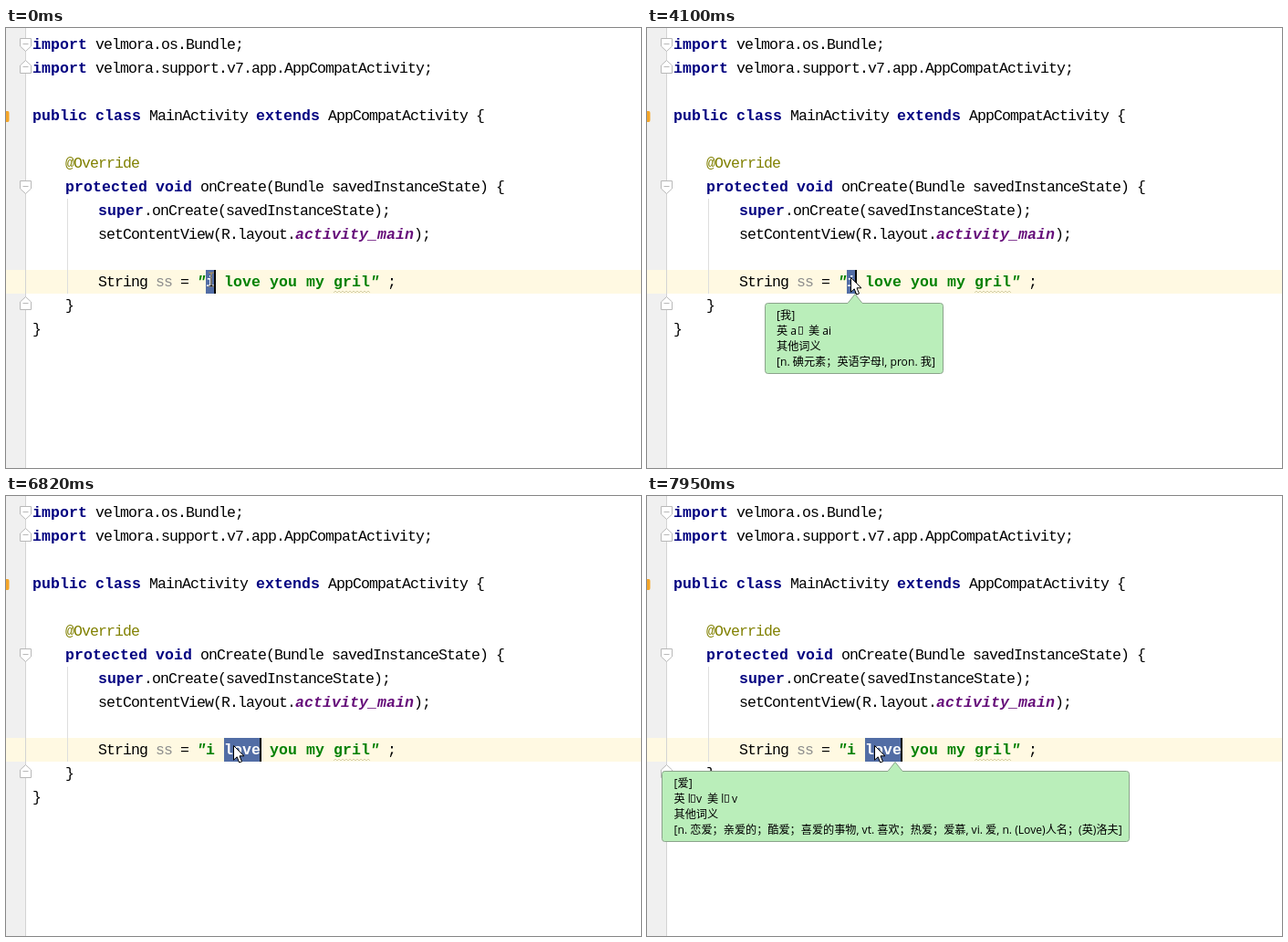
An HTML page for the animation above (8000 ms loop, 696 by 482 pixels).

```html
<!DOCTYPE html>
<html lang="zh-CN">
<head>
<meta charset="utf-8">
<style>
  html, body { margin: 0; width: 100%; height: 100%; overflow: hidden; background: #fff; }
  svg { display: block; width: 696px; height: 482px; }
  .code text { font: 16.5px "Liberation Mono", monospace; letter-spacing: -.9px; fill: #000; }
  .code .b { font-weight: bold; letter-spacing: .1px; }
  .code .key { fill: #000080; }
  .code .note { fill: #808000; }
  .code .dim { fill: #8c8c8c; }
  .code .str { fill: #008000; }
  .code .field { fill: #660e7a; font-style: italic; }
  .code .quote { fill: #008000; font-style: italic; }
  .tip text { font: 12.15px "Open Sans", "Noto Sans CJK SC", sans-serif; fill: #000; }
  .tip path { fill: #baeeba; stroke: #8ba38b; }
  .tip rect { fill: none; stroke: #222; stroke-width: .8; }
  #beam { fill: none; stroke: #fff; stroke-width: 1.2; mix-blend-mode: difference; }
</style>
</head>
<body>
<svg id="stage" viewBox="0 0 696 482" xmlns="http://www.w3.org/2000/svg">
  <rect width="696" height="482" fill="#fff"/>
  <rect width="21" height="482" fill="#f0f0f0"/>
  <rect y="265" width="696" height="26" fill="#fff9e2"/>
  <path d="M21.5 0V482" stroke="#d4d4d4"/>
  <path d="M67.5 187V291" stroke="#dedede"/>
  <path d="M0 91h2q1.5 0 1.5 2v8q0 2-1.5 2h-2z" fill="#f4a62a"/>
  <g id="folds" fill="#fff" stroke="#b8b8b8"></g>
  <rect id="sel" y="265" height="26" fill="#526da5"/>
  <g class="code" id="code"></g>
  <path d="M359 290l2-2 2 2 2-2 2 2 2-2 2 2 2-2 2 2 2-2 2 2 2-2 2 2 2-2 2 2 2-2 2 2 2-2 2 2 2-2 2 2" fill="none" stroke="#cdc69b" stroke-width=".8"/>
  <rect id="caret" y="265" width="2" height="26"/>
  <g id="bulb">
    <path d="M40.5 278Q38.5 276 38.5 273a4.5 4.5 0 0 1 9 0Q47.500 276 45.500 278z" fill="#ffd75e" stroke="#d9a520" stroke-width=".8"/>
    <path d="M41 279.500h4M41 281.500h4" stroke="#777"/>
  </g>
  <g class="tip" id="tipI"></g>
  <g class="tip" id="tipLove"></g>
  <path id="beam" d="M-3 -7.500H-1L0 -6.500 1 -7.500H3M0 -6.500V6.500M-3 7.500H-1L0 6.500 1 7.500H3"/>
  <path id="arrow" d="M.5 .5V16.200L4.200 12.800 6.700 19 9.500 17.900 7 11.800H12z" fill="#fff" stroke="#000"/>
</svg>
<script>
const $ = id => document.getElementById(id);
const NS = "http://www.w3.org/2000/svg";

function add(parent, tag, attrs, text) {
  const el = document.createElementNS(NS, tag);
  for (const k in attrs) el.setAttribute(k, attrs[k]);
  if (text) el.textContent = text;
  return parent.appendChild(el);
}

// Each run: x, style, text
const code = {
  0: [[29, "b key", "import"], [98, "", "velmora.os.Bundle;"]],
  1: [[29, "b key", "import"], [98, "", "velmora.support.v7.app.AppCompatActivity;"]],
  3: [[29, "b key", "public"], [98, "b key", "class"], [157, "", "MainActivity"],
      [274, "b key", "extends"], [353, "", "AppCompatActivity {"]],
  5: [[65, "note", "@Override"]],
  6: [[65, "b key", "protected"], [164, "b key", "void"],
      [213, "", "onCreate(Bundle savedInstanceState) {"]],
  7: [[101, "b key", "super"], [151, "", ".onCreate(savedInstanceState);"]],
  8: [[101, "", "setContentView(R.layout."], [317, "b field", "activity_main"], [447, "", ");"]],
  10: [[101, "", "String"], [164, "dim", "ss"], [191, "", "="], [209, "b quote", '"'],
       [219, "b str", "i"], [239, "b str", "love"], [289, "b str", "you my gril"],
       [399, "b quote", '"'], [418, "", ";"]],
  11: [[65, "", "}"]],
  12: [[29, "", "}"]]
};
const words = {};
for (const row in code)
  for (const [x, cls, s] of code[row])
    words[s] = add($("code"), "text", { x, y: 23 + 26 * row, class: cls }, s);

// Fold markers: centre y and direction of the point
for (const [y, d] of [[18, 1], [43, -1], [174, 1], [302, -1]]) {
  add($("folds"), "path", { d: `M15.500 ${y - 6.5 * d}H27.500V${y + 2 * d}L21.500 ${y + 7.5 * d} 15.500 ${y + 2 * d}z` });
  add($("folds"), "path", { d: `M18.500 ${y - .5}h6` });
}

function balloon(id, left, right, tip, runs, boxes) {
  const l = left + .5, r = right - .5;
  add($(id), "path", {
    d: `M${l + 3} 301.500H${tip - 8}L${tip} 291.500 ${tip + 8} 301.500H${r - 3}q3 0 3 3V375.500q0 3-3 3H${l + 3}q-3 0-3-3V304.500q0-3 3-3z`
  });
  for (const [x, row, s] of runs) add($(id), "text", { x, y: 319 + 17 * row }, s);
  for (const x of boxes) add($(id), "rect", { x, y: 327.5, width: 4, height: 8 });
}
balloon("tipI", 129, 325, 228, [
  [142, 0, "[我]"], [142, 1, "英 a"], [177, 1, "美 ai"], [142, 2, "其他词义"],
  [142, 3, "[n. 碘元素；英语字母I, pron. 我]"]
], [166.5]);
balloon("tipLove", 16, 529, 272, [
  [29.5, 0, "[爱]"], [29.5, 1, "英 l"], [54, 1, "v"], [66, 1, "美 l"], [93, 1, "v"],
  [29.5, 2, "其他词义"],
  [29.5, 3, "[n. 恋爱；亲爱的；酷爱；喜爱的事物, vt. 喜欢；热爱；爱慕, vi. 爱, n. (Love)人名；(英)洛夫]"]
], [48.5, 85.5]);

const LOOP = 8000;
// Times at which parts of the state change
const steps = [
  [0, { sel: "i", caret: 228, on: 1, bulb: 0, tipI: 0, tipLove: 0, beam: 225, arrow: 0 }],
  [810, { bulb: 1, beam: 0, arrow: 223 }],
  [1080, { on: 0 }],
  [1620, { on: 1 }],
  [2050, { on: 0 }],
  [2630, { on: 1 }],
  [2910, { bulb: 0 }],
  [3190, { tipI: .27 }],
  [3310, { tipI: .52 }],
  [3460, { tipI: .8, on: 0 }],
  [3580, { tipI: 1 }],
  [4100, { on: 1 }],
  [4530, { on: 0 }],
  [4960, { on: 1, arrow: 0, beam: 227 }],
  [5080, { beam: 231 }],
  [5200, { beam: 237 }],
  [5320, { beam: 243 }],
  [5470, { on: 0, beam: 251.5 }],
  [5710, { sel: "", caret: 248, on: 1, tipI: .8 }],
  [5860, { sel: "love", caret: 278, tipI: .52 }],
  [6020, { tipI: .25 }],
  [6140, { tipI: 0 }],
  [6820, { beam: 0, arrow: 249 }],
  [7410, { on: 0, tipLove: .15 }],
  [7530, { tipLove: .4 }],
  [7650, { tipLove: .7 }],
  [7800, { tipLove: 1 }],
  [7950, { on: 1 }]
];
const ranges = { "": [0, 0], i: [219, 10], love: [239, 40] };

const show = (id, v) => $(id).setAttribute("opacity", v ? 1 : 0);
const move = (id, x, y) => {
  show(id, x);
  $(id).setAttribute("transform", `translate(${x} ${y})`);
};

function draw(now) {
  const t = now % LOOP, s = {};
  for (const [at, change] of steps) if (at <= t) Object.assign(s, change);
  const [x, w] = ranges[s.sel];
  $("sel").setAttribute("x", x);
  $("sel").setAttribute("width", w);
  for (const k of ["i", "love"]) words[k].style.fill = s.sel === k ? "#fff" : "";
  $("caret").setAttribute("x", s.caret);
  show("caret", s.on);
  show("bulb", s.bulb);
  for (const k of ["tipI", "tipLove"]) $(k).setAttribute("opacity", s[k]);
  move("beam", s.beam, 275.5);
  move("arrow", s.arrow, 273);
}

const start = performance.now();
function tick() {
  draw(performance.now() - start);
  requestAnimationFrame(tick);
}
tick();
</script>
</body>
</html>
```
